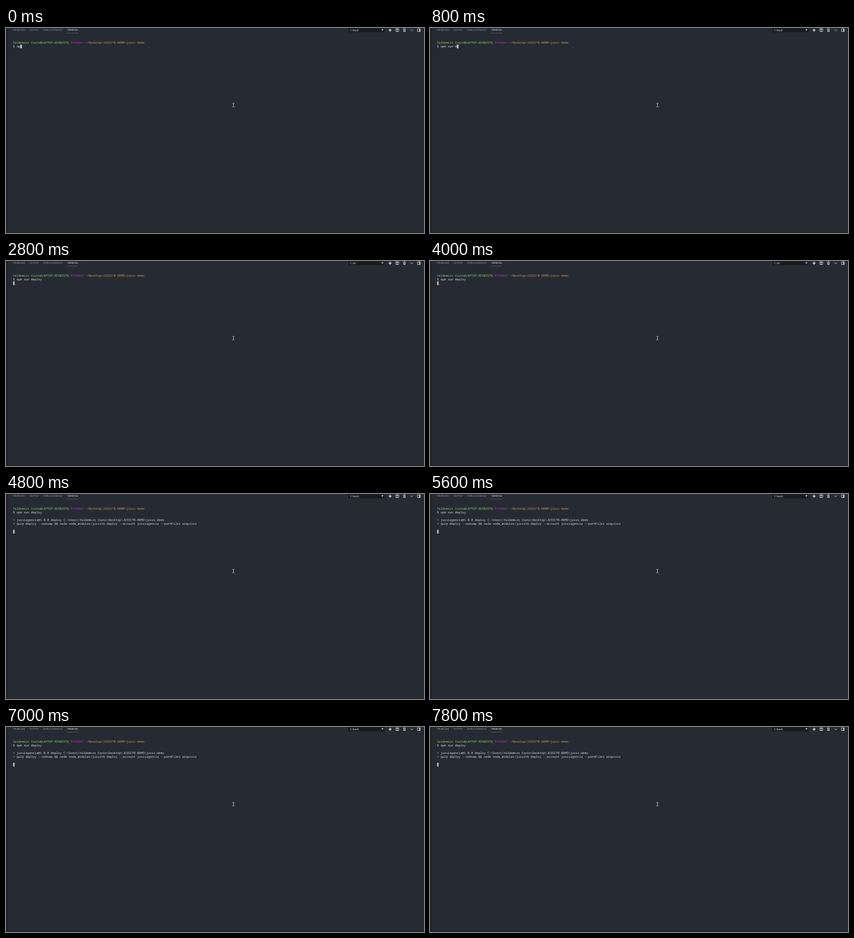
An HTML page that plays this animation: 773 px wide and 380 px high, repeating every 8 s.

```html
<!DOCTYPE html>
<html lang="en">
<head>
<meta charset="utf-8">
<title>Terminal</title>
<style>
  html, body { margin: 0; width: 100%; height: 100%; overflow: hidden; background: #252a33; }
  svg { display: block; }
  text { text-rendering: geometricPrecision; white-space: pre; }
  .tab { font: 4.3px "Open Sans", "Noto Sans", sans-serif; fill: #a4a8ae; }
  .on { fill: #f4f4f4; }
  .pick { font: 500 5.06px "Open Sans", "Noto Sans", sans-serif; fill: #fff; }
  .term { font: 500 5.5556px "Noto Sans Mono", "DejaVu Sans Mono", monospace; fill: #d8dade; }
  .icon { fill: none; stroke: #d4d6d9; stroke-width: .9; }
</style>
</head>
<body>
<svg width="773" height="380" viewBox="0 0 773 380">
  <rect width="773" height="380" fill="#252a33"/>
  <rect width="4" height="380" fill="#20242b"/>
  <rect y="378.5" width="773" height="1.5" fill="#1f2329"/>

  <text class="tab" x="13" y="5.4">PROBLEMS</text>
  <text class="tab" x="43.7" y="5.4">OUTPUT</text>
  <text class="tab" x="69" y="5.4">DEBUG CONSOLE</text>
  <text class="tab on" x="113" y="5.4">TERMINAL</text>
  <rect x="113" y="9" width="21.3" height=".6" fill="#6d727a"/>

  <rect x="633" width="67" height="8" fill="#181b20"/>
  <text class="pick" id="shell" x="635.7" y="5.7">1: bash</text>
  <path d="M694.3 2.2h3.6l-1.8 3z" fill="#f0f0f0"/>

  <g class="icon">
    <path d="M710.3 1.3v5.6M707.5 4.1h5.6" stroke-width="1.5"/>
    <path d="M721 1.7h5.2v4.9h-5.2zM723.6 1.7v4.9M721 2h5.2"/>
    <path d="M734.5 2h4.6M736 1.1h1.6M735.2 2.4v4.3h3.2v-4.3M736.8 2.8v3.6"/>
    <path d="M747.6 2.7l2.7 2.7 2.7-2.7"/>
    <path d="M760.9 1.7h5.2v4.9h-5.2z"/>
    <path d="M764.9 1.7v4.9" stroke-width="1.7"/>
  </g>

  <g id="screen"></g>
  <rect id="cursor" width="3.1" height="6.9"/>

  <path d="M418.7 139.7h1.2l.7.5.7-.5h1.2M420.6 140.2v5.6M418.7 146.3h1.2l.7-.5.7.5h1.2"
    fill="none" stroke="#d6d8da" stroke-width=".9"/>
</svg>
<script>
const LOOP = 8000, LEFT = 13, TOP = 23.7, CELL = 10 / 3, ROW = 7.1;
const USER = "Valdemiro Couto", HOST = "LAPTOP-KERBZDTQ";
const COMMAND = "npm run deploy", TYPO = "npm run deplou";
const ENTER = 2800, OUTPUT = 4400;

const byId = id => document.getElementById(id);
const screen = byId("screen"), cursor = byId("cursor"), shell = byId("shell");

function print(row, col, str, color) {
  const el = document.createElementNS("http://www.w3.org/2000/svg", "text");
  el.setAttribute("class", "term");
  el.setAttribute("x", LEFT + col * CELL);
  el.setAttribute("y", TOP + row * ROW + 5);
  if (color) el.style.fill = color;
  el.textContent = str;
  screen.append(el);
  return el;
}

print(0, 0, USER + "@" + HOST, "#8dd35f");
print(0, 32, "MINGW64", "#b032b4");
print(0, 40, "~/Desktop/JUSSITB-DEMO/jussi-demo", "#d79a4e");
const input = print(1, 0, "$ ");
const output = [
  print(3, 0, "> jussiagencia@1.0.0 deploy C:\\Users\\" + USER + "\\Desktop\\JUSSITB-DEMO\\jussi-demo"),
  print(4, 0, "> gulp deploy --nobump && node node_modules/jussitb deploy --account jussiagencia --pathFiles arquivos")
];

// Types ahead to the slip, pauses, deletes it and corrects the last letter.
function typed(t) {
  if (t >= 2600) return COMMAND;
  if (t >= 2200) return TYPO.slice(0, -1);
  if (t >= 1400) return TYPO;
  const step = Math.min(6, Math.floor(t / 200));
  return TYPO.slice(0, 2 + Math.round(step * 11 / 6));
}

function draw(now) {
  const t = now % LOOP;
  const line = "$ " + typed(t);
  const entered = t >= ENTER, done = t >= OUTPUT;
  input.textContent = line;
  shell.textContent = entered && !done ? "1: sh" : "1: bash";
  for (const el of output) el.style.display = done ? "" : "none";
  cursor.setAttribute("x", LEFT + (entered ? 0 : line.length * CELL));
  cursor.setAttribute("y", TOP + ROW * (done ? 6 : entered ? 2 : 1));
  cursor.setAttribute("fill", entered ? "#adb1b6" : "#c6c9ce");
  requestAnimationFrame(() => draw(performance.now()));
}
draw(performance.now());
</script>
</body>
</html>
```
